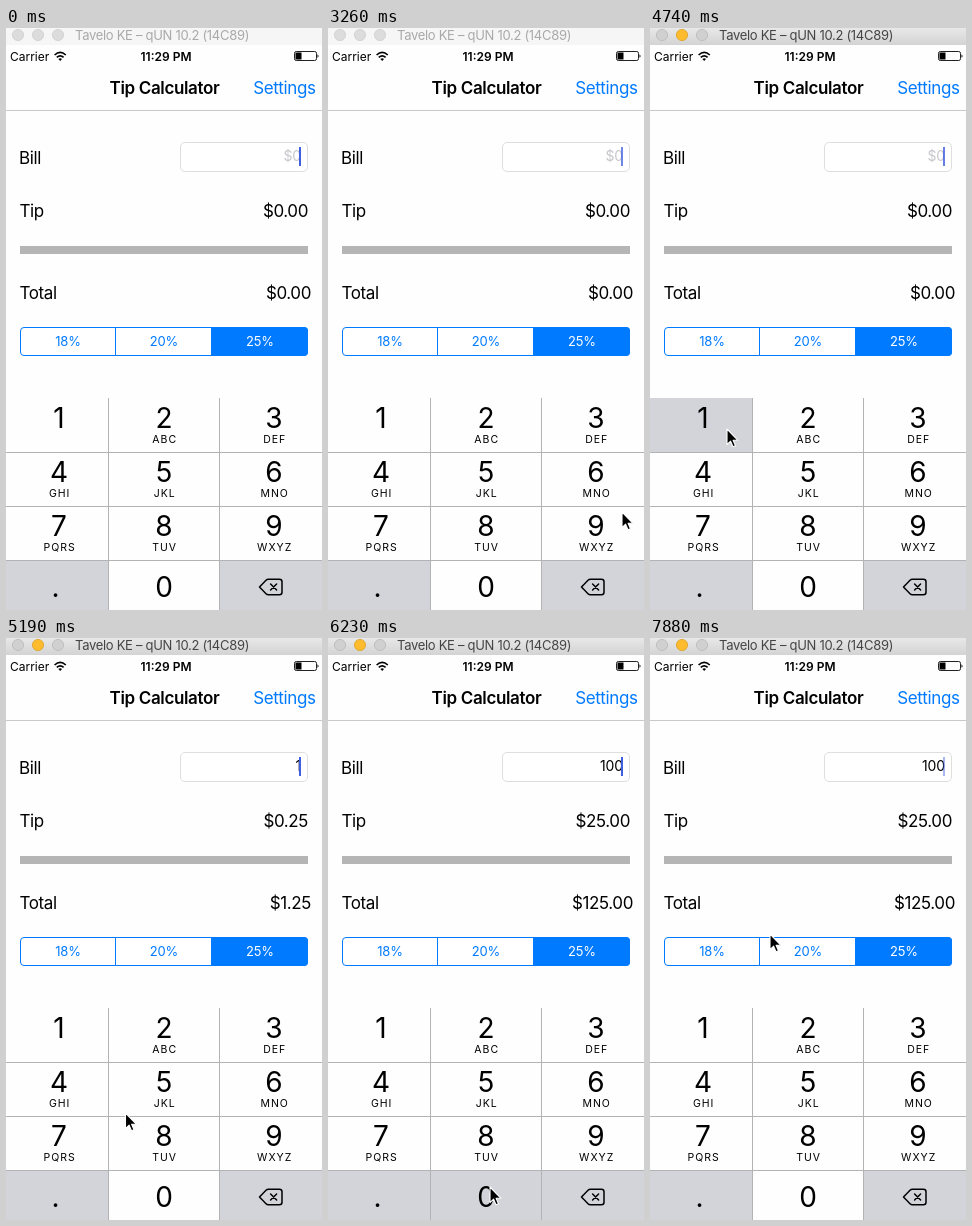
An HTML page that plays this animation: 316 by 582 pixels, repeating every 8000 ms.

```html
<!DOCTYPE html>
<html lang="en">
<head>
<meta charset="utf-8">
<title>Tip Calculator</title>
<style>
  html, body { margin: 0; width: 100%; height: 100%; overflow: hidden; background: #fefefe; }
  svg { display: block; width: 316px; height: 582px; font-family: Inter, Roboto, sans-serif; }
  .body { font-size: 17px; letter-spacing: -.4px; }
  .head { font-size: 17px; font-weight: 600; letter-spacing: -.35px; }
  .end { text-anchor: end; }
  .mid { text-anchor: middle; }
  .blue { fill: #007aff; }
  .seg { font-size: 13px; letter-spacing: -.2px; }
  .digit { font-size: 28px; }
  .sub { font-size: 10.5px; letter-spacing: 1px; }
</style>
</head>
<body>
<svg id="stage" viewBox="0 0 316 582">
  <defs>
    <linearGradient id="chrome" x2="0" y2="1">
      <stop offset="0" stop-color="#e8e8e8"/><stop offset="1" stop-color="#d3d3d3"/>
    </linearGradient>
  </defs>
  <rect width="316" height="582" fill="#fefefe"/>

  <!-- window bar -->
  <rect id="bar" width="316" height="17"/>
  <g stroke-width=".8">
    <circle class="dot" cx="12" cy="7" r="5.6"/>
    <circle class="dot" cx="32" cy="7" r="5.6"/>
    <circle class="dot" cx="52" cy="7" r="5.6"/>
  </g>
  <text id="caption" x="69" y="12" font-size="13" letter-spacing="-.3">Tavelo KE – qUN 10.2 (14C89)</text>

  <!-- status bar -->
  <text x="4" y="32.5" font-size="12">Carrier</text>
  <g fill="none" stroke="#000" stroke-width="1.7">
    <path d="M48.6 27Q54.2 21.8 59.8 27M50.8 29.4Q54.2 26.2 57.6 29.4"/>
    <path d="M52.4 31L54.2 33L56 31Q54.2 29.6 52.4 31Z" fill="#000" stroke="none"/>
  </g>
  <text class="mid" x="160" y="32.5" font-size="12" font-weight="600">11:29 PM</text>
  <rect x="288.5" y="23.5" width="22" height="9" rx="1.8" fill="none" stroke="#222"/>
  <rect x="289.5" y="24.5" width="6" height="7" fill="#000"/>
  <path d="M311.5 26.2Q313.6 28 311.5 29.8Z"/>

  <!-- navigation -->
  <text class="head mid" x="158.5" y="66.2">Tip Calculator</text>
  <text class="body end blue" x="309.5" y="66.2">Settings</text>
  <rect y="82" width="316" height="1" fill="#c9c9c9"/>

  <!-- form -->
  <g class="body">
    <text x="13" y="135.6">Bill</text>
    <text x="13.5" y="188.6">Tip</text>
    <text x="13.5" y="270.6">Total</text>
    <text id="tip" class="end" x="302" y="188.6"></text>
    <text id="total" class="end" x="305" y="270.6"></text>
  </g>
  <rect x="174.5" y="114.5" width="127" height="29" rx="4.5" fill="#fff" stroke="#dedede"/>
  <text id="bill" class="end" x="295" y="133.4" font-size="14" letter-spacing="-.1"></text>
  <rect id="caret" x="293" y="119" width="2" height="19" fill="#3f5fe0"/>
  <rect x="14" y="218" width="288" height="8" fill="#b5b5b5"/>

  <!-- rate picker -->
  <rect x="14.5" y="299.5" width="287" height="28" rx="3.5" fill="#fff" stroke="#007aff"/>
  <path d="M205 299H298Q302 299 302 303V324Q302 328 298 328H205Z" fill="#007aff"/>
  <rect x="109" y="299" width="1" height="29" fill="#007aff"/>
  <g class="seg mid">
    <text class="blue" x="62" y="318">18%</text>
    <text class="blue" x="158" y="318">20%</text>
    <text fill="#fff" x="254" y="318">25%</text>
  </g>

  <g id="pad"></g>
  <g fill="none" stroke="#000" stroke-width="1.5" stroke-linejoin="round" stroke-linecap="round">
    <path d="M253.5 559L260 552.3Q261 551.3 262.4 551.3H273.4Q276 551.3 276 553.8V564.2Q276 566.7 273.4 566.7H262.4Q261 566.7 260 565.7Z"/>
    <path d="M264.6 556L270.6 562M270.6 556L264.6 562"/>
  </g>

  <path id="mouse" d="M0 0V15.6L3.6 12.2L6 17.8L8.5 16.7L6.1 11.3H11Z" stroke="#fff" stroke-width="1.1" stroke-linejoin="round"/>
</svg>
<script>
const LOOP = 8000, RATE = 0.25, GREY = '#d2d4da';
const get = id => document.getElementById(id);
const [bar, caption, tip, total, bill, caret, mouse, pad] =
  ['bar', 'caption', 'tip', 'total', 'bill', 'caret', 'mouse', 'pad'].map(get);
const dots = [...document.querySelectorAll('.dot')];

const cols = [0, 103, 214, 316], mids = [53, 158, 268];
const subs = ['', 'ABC', 'DEF', 'GHI', 'JKL', 'MNO', 'PQRS', 'TUV', 'WXYZ'];
const keys = {};

function add(tag, attrs, text = '') {
  const el = document.createElementNS('http://www.w3.org/2000/svg', tag);
  for (const k in attrs) el.setAttribute(k, attrs[k]);
  el.textContent = text;
  pad.append(el);
  return el;
}

function addKey(label, col, row, sub = '') {
  const y = 370 + row * 54, last = row === 3;
  keys[label] = add('rect', {
    x: cols[col], y, width: cols[col + 1] - cols[col], height: 54,
    fill: last && col !== 1 ? GREY : '#fefefe'
  });
  const x = label === '.' ? 49.5 : mids[col];
  add('text', { class: 'digit mid', x, y: last ? 569 : y + 30 }, label);
  if (sub) add('text', { class: 'sub mid', x: x + 0.7, y: y + 45 }, sub);
}

subs.forEach((sub, i) => addKey(String(i + 1), i % 3, Math.floor(i / 3), sub));
addKey('.', 0, 3);
addKey('0', 1, 3);
addKey('', 2, 3);
for (const x of [102, 213]) add('rect', { x, y: 370, width: 1, height: 212, fill: '#b3b3b6' });
for (const y of [424, 478, 532]) add('rect', { x: 0, y, width: 316, height: 1, fill: '#b3b3b6' });

// [time, value] steps
const blink = [
  [0, 1], [300, .4], [440, 0], [740, .5], [880, 1], [1330, .4], [1480, 0], [1780, .5],
  [1920, 1], [2220, .5], [2370, 0], [2810, 1], [3260, .75], [3410, 0], [3700, .5], [3850, 1],
  [4300, .6], [4450, 0], [4590, .3], [4740, .8], [4890, 1], [6830, .5], [6980, 0],
  [7280, .5], [7430, 1], [7880, .45]
];
const typed = [[0, ''], [4890, '1'], [5790, '10'], [6230, '100']];
const pressed = [[0, ''], [4740, '1'], [5040, ''], [5640, '0'], [5930, ''], [6080, '0'], [6380, '']];
const at = (steps, t) => steps.findLast(s => s[0] <= t)[1];

// pointer moves: start time, number of ticks, destination
const TICK = 145, START = [294, 484], SHOW = 3260, ACTIVE = 4450;
const moves = [[3410, 6, 77, 401], [5040, 4, 162, 549], [7280, 5, 120, 296]];
const ease = p => p * p * (3 - 2 * p);

function pointer(t) {
  let [x, y] = START;
  for (const [t0, n, tx, ty] of moves) {
    if (t < t0) break;
    const p = ease(Math.min(1, (Math.floor((t - t0) / TICK) + 1) / n));
    x += (tx - x) * p;
    y += (ty - y) * p;
  }
  return [x, y];
}

const money = v => '$' + v.toFixed(2);
function setText(el, s) { if (el.textContent !== s) el.textContent = s; }

function draw(t) {
  const on = t >= ACTIVE;
  bar.setAttribute('fill', on ? 'url(#chrome)' : '#f6f6f6');
  caption.setAttribute('fill', on ? '#454545' : '#a9a9a9');
  dots.forEach((d, i) => {
    const lit = on && i === 1;
    d.setAttribute('fill', lit ? '#fdbc2e' : on ? '#d0d0d0' : '#dcdcdc');
    d.setAttribute('stroke', lit ? '#dfa023' : on ? '#b9b9b9' : '#cfcfcf');
  });

  const value = at(typed, t), sum = Number(value);
  setText(bill, value || '$0');
  bill.setAttribute('fill', value ? '#000' : '#c7c7cd');
  setText(tip, money(sum * RATE));
  setText(total, money(sum * (1 + RATE)));
  caret.setAttribute('opacity', at(blink, t));

  const down = at(pressed, t);
  for (const k of ['0', '1']) keys[k].setAttribute('fill', k === down ? GREY : '#fefefe');

  const [x, y] = pointer(t);
  mouse.setAttribute('visibility', t < SHOW ? 'hidden' : 'visible');
  mouse.setAttribute('transform', `translate(${x.toFixed(1)} ${y.toFixed(1)})`);
}

function loop() {
  draw(performance.now() % LOOP);
  requestAnimationFrame(loop);
}
loop();
</script>
</body>
</html>
```
